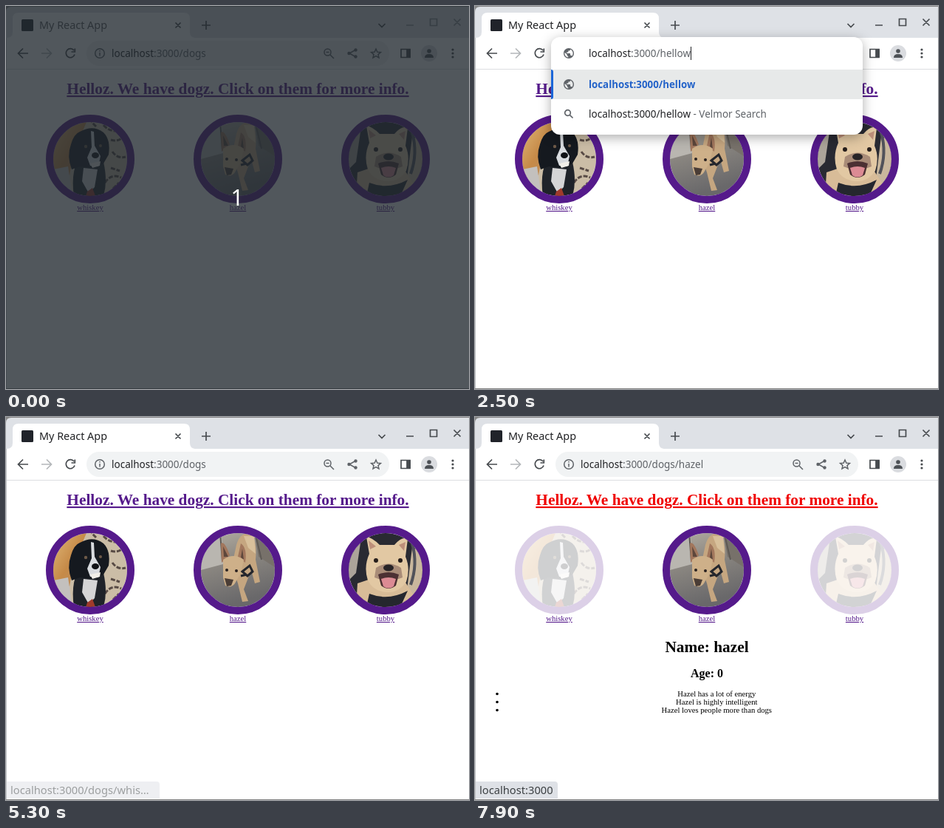
Write an HTML page that moves like this. It is 627x518 px and loops after 8000 ms.

```html
<!DOCTYPE html>
<html lang="en">
<head>
<meta charset="utf-8">
<title>Dog pages</title>
<style>
html, body { margin: 0; width: 627px; height: 518px; overflow: hidden; background: #fff; }
svg { display: block; }
text { white-space: pre; }
.ui { font: 13.5px "Noto Sans", "Open Sans", sans-serif; fill: #202124; }
.ui .dim { fill: #5f6368; }
.ui .hit { fill: #2463c9; }
.ui .bold { font-weight: bold; font-size: 13.3px; }
.page { font: 10.67px "Liberation Serif", serif; text-anchor: middle; }
.page .h1 { font-size: 21.33px; font-weight: bold; }
.page .h2 { font-size: 16px; font-weight: bold; }
.link { fill: #551a8b; text-decoration: underline; }
.line { fill: none; stroke: #474b4f; stroke-width: 1.7; }
.panel { filter: drop-shadow(0 4px 8px rgba(0,0,0,.32)); }
</style>
</head>
<body>
<svg width="627" height="518" viewBox="0 0 627 518">
  <defs>
    <clipPath id="round"><circle r="50"/></clipPath>
    <clipPath id="menuClip"><rect id="menuCut" x="103" y="42" width="422" rx="12"/></clipPath>
    <linearGradient id="wood" x2="1" y2="1">
      <stop stop-color="#e0b878"/><stop offset=".5" stop-color="#c68a48"/><stop offset="1" stop-color="#b58e66"/>
    </linearGradient>
    <linearGradient id="carpet" x2=".3" y2="1">
      <stop stop-color="#b3ada2"/><stop offset=".45" stop-color="#8b8781"/><stop offset="1" stop-color="#69686a"/>
    </linearGradient>
    <path id="globe" transform="scale(.7) translate(-12 -12)" fill="#5f6368" d="M12 2C6.5 2 2 6.5 2 12s4.500 10 10 10 10-4.500 10-10S17.500 2 12 2zm-1 17.900c-4-.5-7-3.800-7-7.900l.2-1.800L9 15v1c0 1.100.9 2 2 2zm6.900-2.500c-.3-.8-1-1.400-1.900-1.400h-1v-3c0-.5-.5-1-1-1H8v-2h2c.5 0 1-.5 1-1V7h2c1.100 0 2-.9 2-2v-.4c3 1.200 5 4 5 7.400 0 2-.8 4-2.100 5.400z"/>
    <g id="glass" class="line" style="stroke:#5f6368"><circle cx="-1.500" cy="-1.500" r="3.800"/><path d="M1.300 1.300 5.500 5.500"/></g>

    <g id="whiskey" clip-path="url(#round)">
      <rect x="-50" y="-50" width="100" height="100" fill="#cbbda6"/>
      <path d="M-50-50H-5L-22-10-28 22-50 28z" fill="url(#wood)"/>
      <path d="M-50 14-30 10-24 50H-50z" fill="#c3c0bd"/>
      <path d="M18-46q7 8 17 8M28-26q9 3 16-3M30-10q7 10 18 7M20 32q8-13 22-7M28 12l12 4M8-44l-6-6M31 40l8-8" fill="none" stroke="#584b45" stroke-width="3" stroke-dasharray="6 2"/>
      <path d="M-18 4H18Q24 30 18 50H-22Q-26 22-18 4z" fill="#1f2329"/>
      <path d="M-9 12 10 14 6 38-2 46-11 30z" fill="#d5d5d6"/>
      <path d="M-4 44l7-5 4 11H-6z" fill="#a03b2c"/>
      <path d="M-14-37Q4-47 18-36 28-26 25-6L18 6 4 12-14 10-25 14Q-32-4-26-20-22-34-14-37z" fill="#15191f"/>
      <path d="M1-38 5-37 6-18 14-4 11 10 0 9-4-2 2-16z" fill="#d9dce0"/>
      <ellipse cx="7" cy="-5" rx="5" ry="4" fill="#101216"/>
      <circle cx="-6" cy="-17" r="2.200" fill="#6e5a48"/><circle cx="14" cy="-18" r="2" fill="#6e5a48"/>
      <path d="M0 6 14 3 13 9 3 12z" fill="#f1efe9"/>
    </g>

    <g id="hazel" clip-path="url(#round)">
      <rect x="-50" y="-50" width="100" height="100" fill="url(#carpet)"/>
      <path d="M-50-50H-22L-20-8-50 0z" fill="#b9b6b0"/>
      <path d="M22-50H50V-4L28-18z" fill="#77716a"/>
      <path d="M-24-50l3 38M24-48l8 34" stroke="#5d5955" stroke-width="2"/>
      <path d="M-2-34Q4-54 20-48 26-34 24-14L30 16 23 18 18 0 8 26 14 42 6 43 0 18-8-6z" fill="#c5a680"/>
      <path d="M8-46 22-46 24-22 14-30z" fill="#d8c09b"/>
      <path d="M-22-10-23-36Q-18-40-11-20zM0-18 4-36Q13-30 10-10z" fill="#a2775d"/>
      <path d="M-19-18-20-32-13-18zM4-17 6-29 8-14z" fill="#5d473c"/>
      <path d="M-20-14Q-6-24 8-14L4 4-4 18Q-9 25-17 21L-20 10z" fill="#ceb089"/>
      <path d="M-18 11-6 13-9 21-15 22z" fill="#4a3d36"/>
      <circle cx="-15" cy="0" r="2" fill="#2a2220"/><circle cx="-2" cy="1" r="2" fill="#2a2220"/>
      <path d="M6 2 16-6 20 2 13 8zM4 8l8-2" fill="none" stroke="#24262c" stroke-width="3"/>
    </g>

    <g id="tubby" clip-path="url(#round)">
      <rect x="-50" y="-50" width="100" height="100" fill="#292a32"/>
      <path d="M-50-50H-32L-40 4-50 14z" fill="#aca49a"/>
      <path d="M36-30 50-26V42L26 50z" fill="#c9b79d"/>
      <path d="M36-36Q44-8 34 20" fill="none" stroke="#51525a" stroke-width="4"/>
      <path d="M-38 18-20 12H24L38 34 30 50H-40z" fill="#d8bc98"/>
      <path d="M-22 32Q4 42 30 28L20 50H-26z" fill="#25272e"/>
      <path d="M-22-22-26-45Q-18-44-8-34H12Q22-46 30-42L27-18Q34-2 28 16 18 30 4 30-16 30-24 14-30-4-22-22z" fill="#e2c8a3"/>
      <path d="M-21-28-23-40-13-32zM18-34 27-38 25-26z" fill="#bd8f7a"/>
      <path d="M-13-3Q4-14 21-3L23 10Q4 18-15 10z" fill="#a98c78"/>
      <path d="M-10 6Q4 0 18 6L14 21Q4 29-6 21z" fill="#4c3033"/>
      <path d="M-6 12Q4 8 14 12L11 22Q4 27-3 22z" fill="#dc8b94"/>
      <ellipse cx="4" cy="-3" rx="7" ry="4.500" fill="#282427"/>
      <circle cx="-13" cy="-13" r="3" fill="#251d1b"/><circle cx="20" cy="-13" r="3" fill="#251d1b"/>
    </g>
  </defs>

  <rect width="627" height="518" fill="#858585"/>
  <path d="M0 517V8Q0 1 7 1H627V517z" fill="#dee1e6"/>
  <path d="M1 43Q9 43 9 35V17Q9 9 17 9H241Q249 9 249 17V35Q249 43 257 43H627V517H1z" fill="#fff"/>
  <path d="M.5 43V517" stroke="#c4c6c9"/>
  <path d="M1 85.500H627" stroke="#dcdee1"/>

  <g id="tab" class="ui">
    <rect id="icon" x="21" y="18" width="16" height="16" rx="1.500" fill="#20232a"/>
    <path id="spin" class="line" style="stroke:#1a73e8;stroke-width:2" d="M29 19A7 7 0 0 1 29 33"/>
    <text id="title" x="45" y="31" style="font-size:14.4px">My React App</text>
    <path class="line" d="M229.500 22.500l7 7m0-7l-7 7M265 26h12M271 20v12M504.500 24l4.500 4.500 4.500-4.500"/>
    <path id="winBtns" class="line" d="M542 26h10M574.500 17.500h9v9h-9zM606.500 17.500l9 9m0-9l-9 9"/>
  </g>

  <g id="tools" class="line">
    <path d="M30 64H17M23 57.500 16.500 64 23 70.500"/>
    <path stroke="#b4b7ba" d="M48 64H61M55 57.500 61.500 64 55 70.500"/>
    <path id="reload" d="M92 60A6 6 0 1 0 93 65.500M93.300 57.500V62H88.500"/>
    <path id="stop" d="M82 59l10 10m0-10l-10 10"/>
    <path d="M535 58.500h12v11h-12z"/><path d="M543 59h4v10h-4z" fill="#474b4f"/>
  </g>
  <circle cx="573" cy="64" r="11" fill="#dadce0"/>
  <circle cx="573" cy="61" r="2.800" fill="#4d5156"/><path d="M567 70q0-5 6-5t6 5z" fill="#4d5156"/>
  <g fill="#474b4f"><circle cx="605" cy="59" r="1.600"/><circle cx="605" cy="64" r="1.600"/><circle cx="605" cy="69" r="1.600"/></g>

  <g id="bar" class="ui">
    <rect id="pill" x="109" y="47" width="410" height="34" rx="17"/>
    <g class="line" style="stroke:#5f6368;stroke-width:1.500">
      <circle cx="127" cy="64" r="6.300"/><path d="M127 63v4.500M127 60v1.600"/>
      <circle cx="435.500" cy="62.500" r="4.500"/><path d="M439 66l5 5M433.500 62.500h4"/>
      <path d="M473 59.500 465 64 473 68.500"/>
      <path d="M501 58l1.900 4.200 4.500.4-3.400 3 1 4.400-4-2.300-4 2.300 1-4.400-3.400-3 4.500-.4z"/>
    </g>
    <g fill="#5f6368"><circle cx="473.500" cy="59.500" r="2.200"/><circle cx="464.500" cy="64" r="2.200"/><circle cx="473.500" cy="68.500" r="2.200"/></g>
    <rect id="mark" x="241" y="55" width="30" height="18" fill="#9ac5f4"/>
    <text id="url" x="143" y="69"></text>
  </g>

  <g id="page" class="page"></g>

  <g id="status" class="ui">
    <path id="bubble" fill="#dee1e6"/>
    <text id="hint" x="6" y="510" style="font-size:14.700px;fill:#3c4043"></text>
  </g>

  <g id="menu" class="ui">
    <g id="sheet">
      <rect id="panel" class="panel" x="103" y="42" width="422" rx="12" fill="#fff"/>
      <g clip-path="url(#menuClip)">
        <rect x="103" y="86" width="422" height="40" fill="#e7e9e9"/>
        <rect x="100" y="86" width="6" height="40" rx="3" fill="#1a66d8"/>
      </g>
    </g>
    <use href="#globe" x="127" y="64"/>
    <text id="typed" x="154" y="69"></text>
    <path id="caret" stroke="#202124"/>
    <g id="rows"></g>
  </g>

  <rect id="veil" width="627" height="518" fill="#21282f"/>
  <text id="count" class="ui" x="313" y="270" text-anchor="middle" style="font-size:30px;fill:#fff">1</text>
</svg>

<script>
const LOOP = 8000;
const $ = id => document.getElementById(id);
const HOST = '<tspan>localhost</tspan>';
const dogs = [
  { name: 'whiskey', age: 4, facts: ['Whiskey loves eating popcorn', 'Whiskey is a terrible guard dog', 'Whiskey wants to cuddle with you'] },
  { name: 'hazel', age: 0, facts: ['Hazel has a lot of energy', 'Hazel is highly intelligent', 'Hazel loves people more than dogs'] },
  { name: 'tubby' }
];

// each entry changes part of the state from its time on
const steps = [
  [0, { veil: .78, count: 1, active: 0, focus: 0, mark: 0, path: 'dogs', query: '', rows: 4, sheet: 1,
        loading: 0, shown: 1, photos: 1, dog: '', hint: '', hintAlpha: 1, red: 0 }],
  [100, { veil: .4, count: 0 }],
  [200, { veil: 0 }],
  [500, { active: 1, focus: 1 }],
  [600, { mark: 1 }],
  [1800, { query: 'he', sheet: .82, mark: 0 }],
  [1900, { sheet: 1 }],
  [2000, { query: 'hel' }],
  [2100, { query: 'hell' }],
  [2200, { query: 'hello' }],
  [2300, { rows: 3 }],
  [2500, { query: 'hellow', rows: 2 }],
  [2600, { query: 'hellowo' }],
  [2700, { query: 'hellowor' }],
  [2900, { query: 'helloworl' }],
  [3000, { query: 'helloworld' }],
  [3500, { query: '', focus: 0, path: 'helloworld' }],
  [3600, { loading: 1 }],
  [3700, { shown: 0 }],
  [3800, { shown: 1, photos: 0, path: 'dogs' }],
  [3900, { loading: 0, photos: 1 }],
  [5300, { hint: '/dogs/whis…', hintAlpha: .5 }],
  [5400, { hintAlpha: 1 }],
  [5600, { dog: 'whiskey' }],
  [5700, { path: 'dogs/whiskey' }],
  [6500, { hint: '/dogs/hazel' }],
  [6900, { dog: 'hazel', path: 'dogs/hazel' }],
  [7700, { hint: ' ' }],
  [7900, { red: 1 }]
];

const show = (id, on) => $(id).setAttribute('display', on ? 'inline' : 'none');
const set = (id, key, value) => $(id).setAttribute(key, value);
const text = (x, y, body, cls = '') => `<text x="${x}" y="${y}" class="${cls}">${body}</text>`;
const span = (cls, body) => `<tspan class="${cls}">${body}</tspan>`;

function pageMarkup(s) {
  let out = `<g ${s.red ? 'style="--c:#f00000"' : ''}>` +
    `<text x="314" y="119" class="h1 link" style="fill:var(--c,#551a8b)">Helloz. We have dogz. Click on them for more info.</text></g>`;
  dogs.forEach((d, i) => {
    const x = 114 + 200 * i;
    const alpha = s.dog && s.dog !== d.name ? .2 : 1;
    out += `<g transform="translate(${x} 207)" opacity="${alpha}">` +
      (s.photos ? `<use href="#${d.name}"/>` : '') +
      '<circle r="55" fill="none" stroke="#551a8b" stroke-width="10"/></g>' +
      text(x, 276, d.name, 'link');
  });
  const d = dogs.find(d => d.name === s.dog);
  if (d) {
    out += text(314, 318, 'Name: ' + d.name, 'h1') + text(314, 352, 'Age: ' + d.age, 'h2');
    d.facts.forEach((f, i) => {
      const y = 378 + 11 * i;
      out += text(327.3, y, f) + `<circle cx="30" cy="${y - 3.5}" r="1.800"/>`;
    });
  }
  return out;
}

function rowsMarkup(s) {
  const site = 'localhost:3000/';
  const history = (word, y) => {
    const n = s.query.length;
    return `<rect x="119" y="${y - 8}" width="16" height="16" rx="1.500" fill="#20232a"/>` +
      text(154, y + 5, 'My React App' + span('dim', ' - ') +
        span('hit bold', site + word.slice(0, n)) + span('hit', word.slice(n)));
  };
  let out = '<use href="#globe" x="127" y="106"/>' + text(154, 111, site + s.query, 'hit bold') +
    '<use href="#glass" x="127" y="146"/>' + text(154, 151, site + s.query + span('dim', ' - Velmor Search'));
  if (s.rows === 4) out += history('hello', 186);
  if (s.rows > 2) out += history('Hello', s.rows === 4 ? 226 : 186);
  return out;
}

function draw(s) {
  const grey = s.active ? 1 : .55;
  set('title', 'opacity', s.active ? 1 : .75);
  set('winBtns', 'opacity', grey);
  show('icon', !s.loading);
  show('spin', s.loading);
  show('reload', !s.loading);
  show('stop', s.loading);

  show('bar', !s.query);
  set('pill', 'fill', s.focus ? '#fff' : '#f1f3f4');
  set('pill', 'stroke', s.focus ? '#1a73e8' : 'none');
  set('pill', 'stroke-width', 2);
  show('mark', s.mark);
  $('url').innerHTML = HOST + span('dim', ':3000/') + span(s.mark ? '' : 'dim', s.path);

  $('page').innerHTML = s.shown ? pageMarkup(s) : '';

  show('status', s.hint);
  set('status', 'opacity', s.hintAlpha);
  $('hint').textContent = 'localhost:3000' + s.hint.trim();
  const edge = { '/dogs/whis…': 208, '/dogs/hazel': 194 }[s.hint] || 112;
  set('bubble', 'd', `M1 493H${edge - 4}q4 0 4 4V516H1z`);

  show('menu', s.query);
  if (s.query) {
    const height = 52 + 40 * s.rows;
    set('panel', 'height', height);
    set('menuCut', 'height', height);
    set('sheet', 'opacity', s.sheet);
    set('rows', 'opacity', s.sheet < 1 ? .92 : 1);
    $('typed').innerHTML = HOST + span('dim', ':3000/' + s.query);
    set('caret', 'd', `M${Math.round(154 + $('typed').getComputedTextLength()) + .5} 55V73`);
    $('rows').innerHTML = rowsMarkup(s);
  }

  set('veil', 'opacity', s.veil);
  show('count', s.count);
}

let last = -1;
function frame(now) {
  const t = now % LOOP;
  const past = steps.filter(([at]) => at <= t);
  if (past.length !== last) {
    last = past.length;
    draw(Object.assign({}, ...past.map(p => p[1])));
  }
  set('spin', 'transform', `rotate(${t * .36} 29 26)`);
  requestAnimationFrame(frame);
}
frame(0);
</script>
</body>
</html>
```
